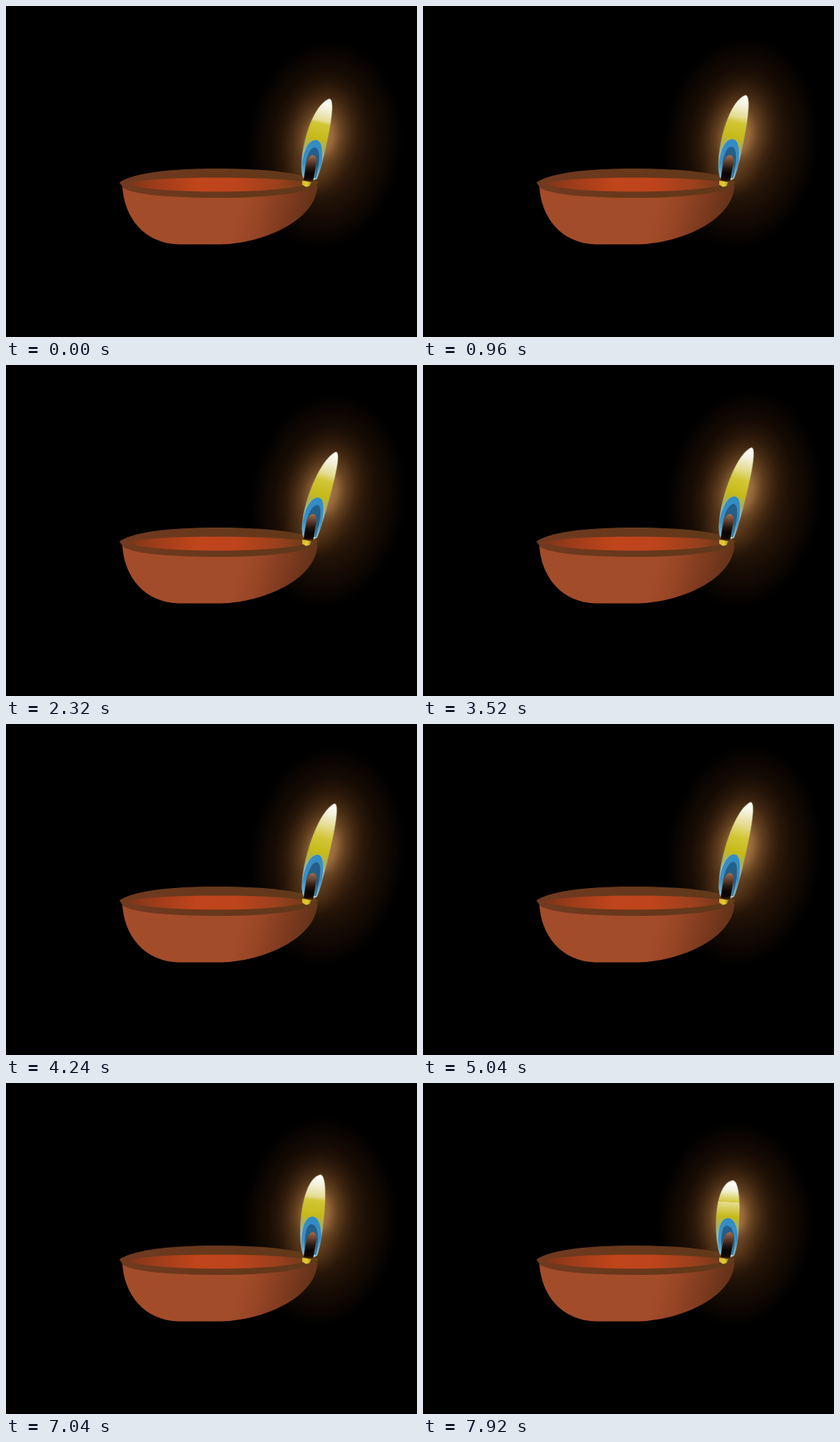
Recreate the animation shown at these times as an HTML page with a canvas. Size 562 px wide and 452 px high, loop 8000 ms.

```html
<!DOCTYPE html>
<html lang="en">
<head>
<meta charset="utf-8">
<title>Oil lamp</title>
<style>
  html, body { margin: 0; width: 100%; height: 100%; overflow: hidden; background: #000; }
  canvas { display: block; width: 562px; height: 452px; }
</style>
</head>
<body>
<canvas id="stage" width="562" height="452"></canvas>
<script>
const c = document.getElementById('stage').getContext('2d');
const LOOP = 8000, STEP = 80;

// time, flame tip x, flame tip y
const tips = [
  [0, 441, 127], [960, 440, 122], [2320, 450, 119], [3520, 448, 113],
  [5040, 447, 107], [6240, 435, 118], [7920, 423, 133]
];

function slope(i, k) {
  const a = tips[Math.max(i - 1, 0)], b = tips[Math.min(i + 1, tips.length - 1)];
  return (b[k] - a[k]) / (b[0] - a[0]);
}

// Hermite curve through the tip positions
function tipAt(t) {
  let i = 0;
  while (i < tips.length - 2 && t >= tips[i + 1][0]) i++;
  const a = tips[i], b = tips[i + 1], d = b[0] - a[0];
  const u = Math.min((t - a[0]) / d, 1), u2 = u * u, u3 = u2 * u;
  return [1, 2].map(k =>
    (2 * u3 - 3 * u2 + 1) * a[k] + (u3 - 2 * u2 + u) * d * slope(i, k) +
    (3 * u2 - 2 * u3) * b[k] + (u3 - u2) * d * slope(i + 1, k));
}

function stops(g, list) {
  list.forEach(([p, col]) => g.addColorStop(p, col));
  return g;
}
const linear = (x0, y0, x1, y1, list) => stops(c.createLinearGradient(x0, y0, x1, y1), list);

function fill(d, style) {
  c.fillStyle = style;
  c.fill(new Path2D(d));
}

// soft ellipse, optionally leaning to the right
function halo(x, y, rx, ry, lean, list) {
  c.save();
  c.translate(x, y);
  c.rotate(lean);
  c.scale(rx, ry);
  c.fillStyle = stops(c.createRadialGradient(0, 0, 0, 0, 0, 1), list);
  c.fillRect(-1, -1, 2, 2);
  c.restore();
}

const BODY = 'M159 245C161 290 190 324 235 325.5L295 325.5C350 324 424 294 426 245Z';
const RIM = 'M155 241C172 229 218 222 290 222C355 222 412 228 427 241C420 254 370 262 290 262C220 262 172 257 160 248Z';
const INSIDE = 'M165 243C180 237 225 234.5 290 234.5C350 234.5 398 237 417 242C398 249 352 253.5 290 253.5C225 253.5 182 249 165 243Z';

function drawBowl() {
  fill(BODY, linear(325, 255, 428, 285, [
    [0, '#a34c2a'], [0.25, '#984626'], [0.6, '#7d3a1f'], [1, '#593016']
  ]));
  fill(RIM, linear(155, 0, 428, 0, [
    [0, '#713a20'], [0.4, '#69381c'], [0.8, '#63381a'], [1, '#5e3819']
  ]));
  fill(INSIDE, linear(165, 0, 417, 0, [
    [0, '#7c3519'], [0.15, '#9c3c1a'], [0.38, '#c0451b'],
    [0.6, '#bd441c'], [0.82, '#99401d'], [1, '#713a1b']
  ]));
}

function drawFlame(x, y) {
  const lean = (x - 415) / 30;
  const flame = `M407 236C397 215 ${x - 27} ${y + 3 + 10 * lean} ${x} ${y}` +
    `C${x + 15} ${y - 6 * lean} 434 215 425 236Q416 241 407 236Z`;
  const bx = 423 + (x - 441) * 0.35, by = 183 + (y - 127) * 0.25;
  const at = v => (v - y) / (238 - y);

  fill(flame, linear(x, y, 416, 238, [
    [0, '#ffffff'], [at(y + 14), '#f3f1dc'], [at(y + 30), '#e5dc92'],
    [at(by - 22), '#d2c636'], [at(by - 2), '#c6b91a'],
    [at(by + 12), '#a5b066'], [at(by + 24), '#8fbcc4'], [1, '#b4d6dc']
  ]));
  c.strokeStyle = 'rgba(140,130,85,.55)';
  c.lineWidth = 1;
  c.stroke(new Path2D(flame));

  c.save();
  c.clip(new Path2D(flame));
  fill(`M404 233C403 212 ${bx - 14} ${by + 1} ${bx} ${by}C${bx + 12} ${by} 434 208 428 235Z`,
    linear(0, by, 0, 236, [[0, '#2f8cc8'], [0.6, '#3f8fc0'], [1, '#86bfd6']]));
  fill(`M408 234C408 214 ${bx - 10} ${by + 11} ${bx - 1} ${by + 10}C${bx + 8} ${by + 11} 429 214 424 235Z`,
    linear(0, by + 10, 0, 236, [[0, '#24618f'], [0.55, '#285b7c'], [1, '#4f8396']]));
  c.restore();
}

function drawWick() {
  fill('M407 237C410 222 411 205 419 203.5C426 203.5 425 213 423 222L420 239Q413 241 407 237Z',
    linear(0, 203, 0, 240, [
      [0, '#a8714d'], [0.22, '#704631'], [0.5, '#28170f'], [0.7, '#080403'], [0.9, '#100802'], [1, '#4d2c0e']
    ]));
  fill('M405 238.5L417.5 240.5L415 246L410 247L405 244Z',
    linear(405, 0, 418, 0, [[0, '#d9b322'], [0.5, '#e0cf38'], [1, '#a8851b']]));
}

function draw(t) {
  const [x, y] = tipAt(t);
  const gx = (x + 420) / 2, gy = (y + 232) / 2, half = (232 - y) / 2;
  const tilt = Math.atan2(x - 416, 236 - y);

  c.fillStyle = '#000';
  c.fillRect(0, 0, 562, 452);
  halo(gx + 5, gy + 10, 112, half + 98, tilt * 0.5, [
    [0, '#402611'], [0.35, '#2d190a'], [0.65, '#170c04'], [0.85, '#080402'], [1, 'rgba(0,0,0,0)']
  ]);
  halo(gx, gy, 66, half + 42, tilt, [
    [0, 'rgba(185,135,80,.95)'], [0.25, 'rgba(165,116,66,.85)'], [0.42, 'rgba(122,82,42,.7)'],
    [0.62, 'rgba(86,54,25,.5)'], [0.82, 'rgba(58,34,14,.22)'], [1, 'rgba(45,25,10,0)']
  ]);
  drawBowl();
  halo(418, 228, 42, 34, 0, [
    [0, 'rgba(125,82,40,.5)'], [0.5, 'rgba(105,65,30,.28)'], [1, 'rgba(90,52,24,0)']
  ]);
  drawFlame(x, y);
  drawWick();
}

function tick() {
  const t = performance.now() % LOOP;
  draw(Math.floor(t / STEP) * STEP);
  requestAnimationFrame(tick);
}
tick();
</script>
</body>
</html>
```
